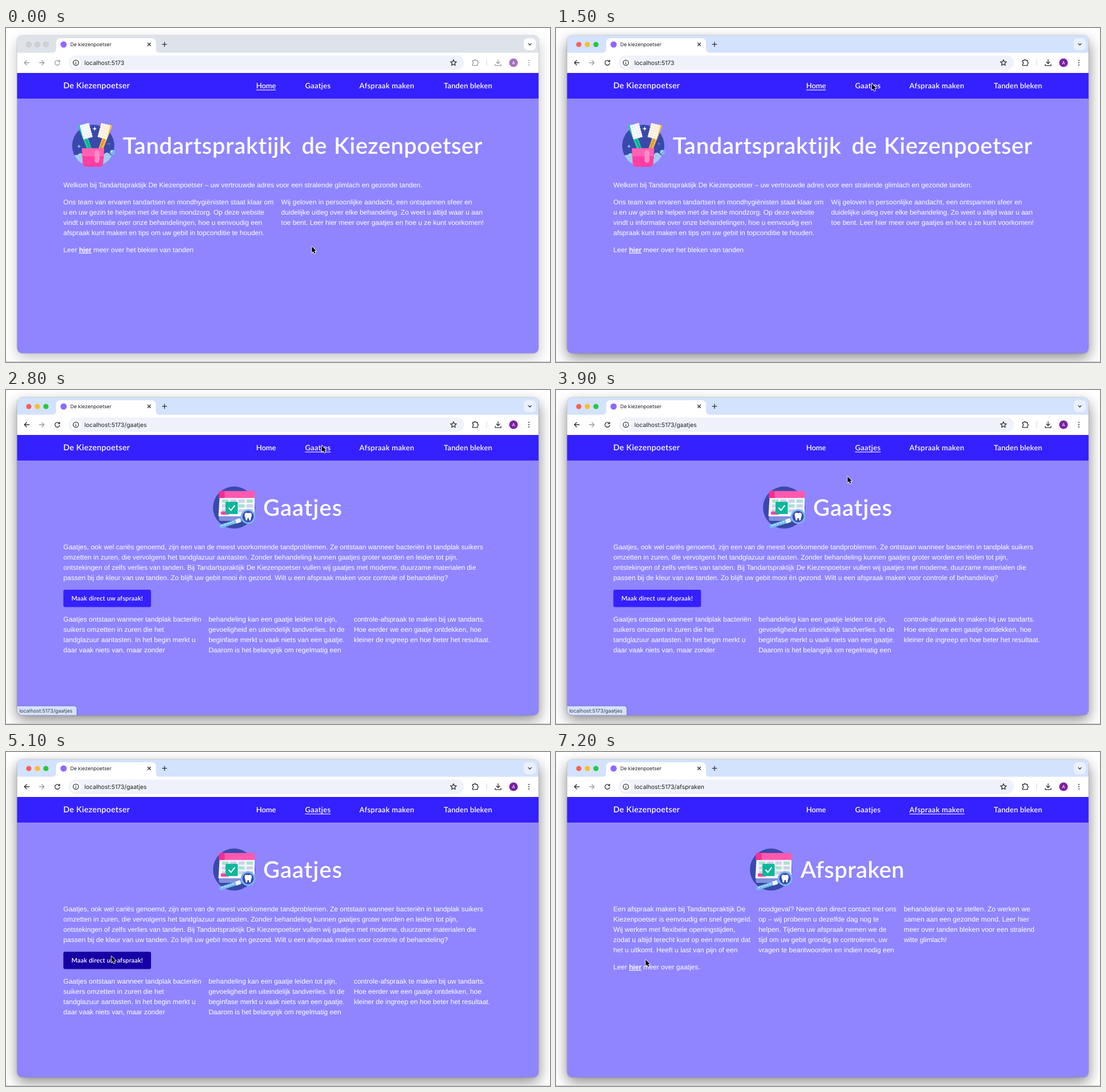
Recreate the animation shown at these times as an HTML page. Size 954 by 587 pixels, loop 8 s.

```html
<!DOCTYPE html>
<html lang="nl">
<head>
<meta charset="utf-8">
<title>De kiezenpoetser</title>
<style>
html, body { margin: 0; width: 100%; height: 100%; overflow: hidden; background: #fff; }
svg { display: block; width: 954px; height: 587px; --strip: #dee2e9; --icon: #9a9c9f; --chip: #fff; --user: #a56fc1;
  --r: #d0d1d4; --y: #d0d1d4; --g: #d0d1d4; --edge: #bfc0c3; }
svg.on { --strip: #d3e2fd; --icon: #2f3235; --chip: #eaf1fe; --user: #7b1fa2;
  --r: #fe5f57; --y: #febc2e; --g: #28c840; --edge: none; }
text { text-rendering: geometricPrecision; white-space: pre; }
.body { font: 12.03px "Liberation Sans", Arial, sans-serif; fill: #fff; }
.body .link { font-weight: 700; text-decoration: underline; }
.round { font-family: Lato, sans-serif; font-weight: 600; fill: #fff; }
.ui { font-family: Inter, sans-serif; fill: #202124; }
.line { fill: none; stroke-width: 1.3; stroke-linecap: round; stroke-linejoin: round; }
</style>
</head>
<body>
<svg id="stage" viewBox="0 0 954 587" xmlns="http://www.w3.org/2000/svg">
  <defs>
    <clipPath id="frame"><rect x="19.6" y="13.2" width="914.2" height="558.2" rx="8.5"/></clipPath>
    <clipPath id="disc"><circle cx="153" cy="207" r="37"/></clipPath>
    <filter id="soft" x="-10%" y="-10%" width="120%" height="125%"><feGaussianBlur stdDeviation="12"/></filter>
    <filter id="near" x="-10%" y="-10%" width="120%" height="125%"><feGaussianBlur stdDeviation=".8"/></filter>
  </defs>
  <rect width="954" height="587" fill="#fff"/>
  <rect id="shade" x="19" y="23" width="916" height="557" rx="9" filter="url(#soft)"/>
  <rect x="19.3" y="13" width="914.800" height="559" rx="9" opacity=".2" filter="url(#near)"/>
  <rect y="586" width="954" height="1" fill="#c6c6c8"/>

  <g clip-path="url(#frame)">
    <rect x="19" y="13" width="916" height="32" fill="var(--strip)"/>
    <rect x="19" y="43.5" width="916" height="36" fill="#fff"/>
    <path d="M80 44q8 0 8-8V26q0-8 8-8H255q8 0 8 8V36q0 8 8 8Z" fill="#fff"/>
    <g stroke="var(--edge)" stroke-width=".7">
      <circle cx="40" cy="29" r="4.6" fill="var(--r)"/>
      <circle cx="55" cy="29" r="4.6" fill="var(--y)"/>
      <circle cx="70" cy="29" r="4.6" fill="var(--g)"/>
    </g>
    <circle cx="101" cy="29" r="5.5" fill="#9068ff"/>
    <text class="ui" x="112.7" y="31.8" font-size="8.75">De kiezenpoetser</text>
    <g class="line" stroke="#2f3235">
      <path d="M248.6 26.2l5 5m0-5l-5 5M274.2 28.7h7.6m-3.8-3.8v7.6"/>
    </g>
    <rect x="908" y="18" width="21" height="21" rx="6.5" fill="var(--chip)"/>
    <path class="line" d="M916 27.4l2.6 2.6 2.6-2.6" stroke="#2f3235"/>

    <rect x="110" y="48.3" width="693" height="25.4" rx="12.7" fill="#eff2fa"/>
    <circle cx="122.5" cy="61" r="9" fill="#fff"/>
    <g class="line" stroke="#2f3235">
      <circle cx="122.5" cy="61" r="4.7"/>
      <path d="M122.5 60.8v2.4M122.5 58.6v.1"/>
      <path d="M784.7 55.8l1.5 3.4 3.7.3-2.8 2.5.8 3.7-3.2-2-3.2 2 .8-3.7-2.8-2.5 3.7-.3z"/>
    </g>
    <text class="ui" id="url" x="137.6" y="64.7" font-size="10.4"></text>
    <g class="line" stroke="var(--icon)">
      <path d="M40.7 61H32.2m4-4l-4 4 4 4"/>
      <path d="M58.5 61H67m-4-4l4 4-4 4" stroke="#9a9c9f"/>
      <path d="M93.7 59a4.2 4.2 0 1 0 .5 2.800M94.2 56.4v2.800h-2.800"/>
      <path d="M818.2 57h2.7a1.5 1.5 0 0 1 3 0h2.9v2.9a1.5 1.5 0 0 1 0 3v3h-8.6v-2.7a1.7 1.7 0 0 0 0-3.4z"/>
      <path d="M863 55.6v7m-3-2.9l3 3 3-3M858 63.6v2.6h10v-2.6"/>
    </g>
    <rect x="842.3" y="55.5" width="1.2" height="11" fill="#cfdcf7"/>
    <circle cx="890" cy="61" r="7.6" fill="var(--user)"/>
    <text class="ui" x="890" y="64" font-size="8" text-anchor="middle" style="fill:#fff">A</text>
    <g fill="var(--icon)"><circle cx="917" cy="57" r="1.1"/><circle cx="917" cy="61" r="1.1"/><circle cx="917" cy="65" r="1.1"/></g>

    <rect x="19" y="79" width="916" height="493" fill="#8f85ff"/>
    <rect x="19" y="79" width="916" height="45" fill="#3520ff"/>
    <g id="nav"></g>
    <rect id="mark" y="108.4" height="1.1" fill="#fff"/>

    <g id="home">
      <circle cx="153" cy="207" r="37" fill="#3949ab"/>
      <g clip-path="url(#disc)" fill="#a3cdf0">
        <circle cx="124" cy="231" r="8"/><circle cx="131" cy="226" r="6"/><circle cx="131" cy="238" r="9"/>
        <circle cx="177" cy="225" r="6"/><circle cx="182" cy="231" r="8"/><circle cx="174" cy="237" r="9"/>
      </g>
      <circle cx="186.7" cy="218.5" r="4.6" fill="#79b7ea"/>
      <path d="M184.5 218a2.4 2.4 0 0 1 2-2" class="line" stroke="#d8eefc"/>
      <g id="brushes"></g>
      <path d="M133 211.5h39l-1.5 26q-.6 6.5-7 6.5h-22q-6.4 0-7-6.5z" fill="#ff3fa2"/>
      <path d="M133 211.5h39l-.8 14h-37.4z" fill="#ff62b4"/>
      <rect x="155.5" y="215" width="8.5" height="22" rx="4.2" fill="#ff8cca"/>
      <g id="stars"></g>
    </g>

    <g id="calendar">
      <circle cx="400" cy="206.6" r="37" fill="#3949ab"/>
      <path d="M374.5 189h61.5v33h-63.5z" fill="#f4f5fd"/>
      <path d="M373.5 222h40v8h-37q-3 0-3-3z" fill="#8290dd"/>
      <path d="M376 177.5h58q2.5 0 2.5 2.5v9.8h-63l.5-10q.2-2.3 2-2.3z" fill="#ff58b0"/>
      <path d="M376 177.5h7.5v12.3h-10l.5-10q.2-2.3 2-2.3z" fill="#f72d93"/>
      <g id="cells"></g>
      <rect x="377" y="213.5" width="14" height="5.5" rx="1" fill="#ff3fa2"/>
      <rect x="385" y="196.5" width="21.5" height="21.5" rx="1.5" fill="#10b69a"/>
      <path d="M391 207.5l3.6 4 6.2-8.2" class="line" stroke="#fff" style="stroke-width:2"/>
      <path d="M377.5 239.5L410 229" stroke="#75bdec" stroke-width="6.5" stroke-linecap="round"/>
      <path d="M378 238.3L400 231.3" stroke="#b8e2f8" stroke-width="2" stroke-dasharray="3 2"/>
      <path d="M403 231.3l8-2.6" stroke="#f4f5fd" stroke-width="7"/>
      <circle cx="424.5" cy="222.5" r="11.4" fill="#3949b5" stroke="#78b7ec" stroke-width="3"/>
      <path d="M418.5 219.5q0-4 3.4-3.7l2.8.8 2.8-.8q3.4-.3 3.4 3.7 0 3-1.3 5-.4 5-2 5-1.3 0-1.5-3.5-1.4-1.8-2.8 0-.2 3.5-1.5 3.5-1.6 0-2-5-1.3-2-1.3-5z" fill="#fff"/>
    </g>

    <g id="holes">
      <rect id="button" x="100.6" y="351" width="153.7" height="30.5" rx="3"/>
    </g>
    <g id="visit"></g>

    <g id="status">
      <path d="M18 555.2H120q4.800 0 4.800 5V573H18z" fill="#5a58a8" opacity=".5" filter="url(#near)"/>
      <path d="M18 555.800H119.500q4.300 0 4.300 4.500V572H18z" fill="#d5e2fb"/>
      <text class="ui" x="23.2" y="566.800" font-size="8.9" style="fill:#3c4043">localhost:5173/gaatjes</text>
    </g>
  </g>
  <path id="cursor" d="M0 0V10.8L2.5 8.5 4.2 12.4 6 11.6 4.300 7.800H7.600Z" fill="#000" stroke="#fff" stroke-width="1.7" stroke-linejoin="round" paint-order="stroke"/>
</svg>
<script>
const $ = id => document.getElementById(id);
const add = (id, html) => $(id).insertAdjacentHTML('beforeend', html);
const LEFT = 100.6;

function lines(id, x, y, rows) {
  rows.forEach((row, i) => add(id, `<text class="body" x="${x}" y="${y + i * 18}">${row}</text>`));
}
function round(id, x, y, size, gap, str, anchor = 'start') {
  add(id, `<text class="round" x="${x}" y="${y}" font-size="${size}" letter-spacing="${gap}" text-anchor="${anchor}">${str}</text>`);
}

// Navigation: x, underline width, letter gap, label
const menu = [
  [438.8, 34.5, -.1, 'Home'], [524.4, 45, .3, 'Gaatjes'],
  [619.8, 96.7, .3, 'Afspraak maken'], [767.8, 85, .15, 'Tanden bleken']
];
round('nav', LEFT, 106.3, 14.3, .25, 'De Kiezenpoetser');
menu.forEach(([x, , gap, label]) => round('nav', x, 106, 13, gap, label));

// Illustrations
function brush(x, y, angle, side, body, dark, hair, shade) {
  let dots = '';
  for (let r = 0; r < 6; r++)
    for (let c = 0; c < 4; c++)
      dots += `<circle cx="${c * 4.2 - 3.5}" cy="${r * 4.3 - 10.700}" r="2.3"/>`;
  add('brushes', `<g transform="translate(${x} ${y}) rotate(${angle}) scale(${side} 1)">
    <path d="M-9-11q0-2.500 2.500-2.500H1L5 46H-2z" fill="${body}"/>
    <path d="M-3 14H0L5 46H2z" fill="${dark}"/>
    <rect x="-5.500" y="-12.500" width="16" height="25" rx="2" fill="${shade}"/><g fill="${hair}">${dots}</g></g>`);
}
brush(138, 182, -15, 1, '#22c9a6', '#14ad91', '#fafbff', '#d5daee');
brush(174.5, 182, 15, -1, '#f3b650', '#dd9838', '#fff6e6', '#f0d9b0');

const star = (x, y, r, fill) => add('stars',
  `<path transform="translate(${x} ${y}) scale(${r})" d="M0-1L.25-.25 1 0 .25.25 0 1-.25.25-1 0-.25-.25Z" fill="${fill}"/>`);
star(155.5, 177, 4, '#fff');
star(128, 208, 3.6, '#8cc4f2');
star(180.5, 203.5, 3.2, '#5d7fe0');

for (let r = 0; r < 3; r++)
  for (let c = 0; c < 4; c++) {
    const fill = (r + c) % 3 ? '#cdd1ea' : '#a5e4cd';
    add('cells', `<rect x="${379 + c * 14.3}" y="${192.5 + r * 8.5}" width="11" height="5.5" fill="${fill}"/>`);
  }

// Home page
round('home', 204.8, 221, 40, .7, 'Tandartspraktijk');
round('home', 518.5, 221, 40, .3, 'de');
round('home', 575, 221, 40, .5, 'Kiezenpoetser');
lines('home', LEFT, 280, ['Welkom bij Tandartspraktijk De Kiezenpoetser – uw vertrouwde adres voor een stralende glimlach en gezonde tanden.']);
lines('home', LEFT, 310, [
  'Ons team van ervaren tandartsen en mondhygiënisten staat klaar om',
  'u en uw gezin te helpen met de beste mondzorg. Op deze website',
  'vindt u informatie over onze behandelingen, hoe u eenvoudig een',
  'afspraak kunt maken en tips om uw gebit in topconditie te houden.']);
lines('home', 482.6, 310, [
  'Wij geloven in persoonlijke aandacht, een ontspannen sfeer en',
  'duidelijke uitleg over elke behandeling. Zo weet u altijd waar u aan',
  'toe bent. Leer hier meer over gaatjes en hoe u ze kunt voorkomen!']);
lines('home', LEFT, 394, ['Leer <tspan class="link">hier</tspan> meer over het bleken van tanden']);

// Cavities page
round('holes', 520.5, 221, 40, 1, 'Gaatjes', 'middle');
lines('holes', LEFT, 280, [
  'Gaatjes, ook wel cariës genoemd, zijn een van de meest voorkomende tandproblemen. Ze ontstaan wanneer bacteriën in tandplak suikers',
  'omzetten in zuren, die vervolgens het tandglazuur aantasten. Zonder behandeling kunnen gaatjes groter worden en leiden tot pijn,',
  'ontstekingen of zelfs verlies van tanden. Bij Tandartspraktijk De Kiezenpoetser vullen wij gaatjes met moderne, duurzame materialen die',
  'passen bij de kleur van uw tanden. Zo blijft uw gebit mooi én gezond. Wilt u een afspraak maken voor controle of behandeling?']);
round('holes', 177.5, 370.2, 11, .15, 'Maak direct uw afspraak!', 'middle');
lines('holes', LEFT, 407, [
  'Gaatjes ontstaan wanneer tandplak bacteriën', 'suikers omzetten in zuren die het',
  'tandglazuur aantasten. In het begin merkt u', 'daar vaak niets van, maar zonder']);
lines('holes', 355.2, 407, [
  'behandeling kan een gaatje leiden tot pijn,', 'gevoeligheid en uiteindelijk tandverlies. In de',
  'beginfase merkt u vaak niets van een gaatje.', 'Daarom is het belangrijk om regelmatig een']);
lines('holes', 609.9, 407, [
  'controle-afspraak te maken bij uw tandarts.', 'Hoe eerder we een gaatje ontdekken, hoe',
  'kleiner de ingreep en hoe beter het resultaat.']);

// Appointment page
round('visit', 520, 221, 40, .4, 'Afspraken', 'middle');
lines('visit', LEFT, 280, [
  'Een afspraak maken bij Tandartspraktijk De', 'Kiezenpoetser is eenvoudig en snel geregeld.',
  'Wij werken met flexibele openingstijden,', 'zodat u altijd terecht kunt op een moment dat',
  'het u uitkomt. Heeft u last van pijn of een']);
lines('visit', 355.2, 280, [
  'noodgeval? Neem dan direct contact met ons', 'op – wij proberen u dezelfde dag nog te',
  'helpen. Tijdens uw afspraak nemen we de', 'tijd om uw gebit grondig te controleren, uw',
  'vragen te beantwoorden en indien nodig een']);
lines('visit', 609.9, 280, [
  'behandelplan op te stellen. Zo werken we', 'samen aan een gezonde mond. Leer hier',
  'meer over tanden bleken voor een stralend', 'witte glimlach!']);
lines('visit', LEFT, 382, ['Leer <tspan class="link">hier</tspan> meer over gaatjes.']);

// Pointer route: time, x, y
const route = [
  [0, 536.4, 384], [300, 541, 330], [600, 555, 190], [900, 558, 112], [1400, 554, 98],
  [3600, 554, 98], [3800, 538, 118], [4100, 458, 220], [4400, 377.8, 313.8], [4500, 358, 330],
  [4800, 262, 347], [5100, 185, 359], [5400, 156.5, 363], [6200, 157.2, 365], [8000, 157.2, 365]
];
function along(t) {
  let i = 1;
  while (route[i][0] < t) i++;
  const [t0, x0, y0] = route[i - 1], [t1, x1, y1] = route[i];
  const k = (t - t0) / (t1 - t0);
  return [x0 + (x1 - x0) * k, y0 + (y1 - y0) * k];
}
const clamp = v => Math.max(0, Math.min(1, v));
const show = (id, on) => $(id).style.display = on ? '' : 'none';
const paths = ['', '/gaatjes', '/afspraken'];

function draw(time) {
  const t = Math.floor(time / 100) * 100;
  const page = t < 2800 ? 0 : t < 7100 ? 1 : 2;
  const focus = t >= 1500;
  $('stage').classList.toggle('on', focus);
  $('shade').setAttribute('opacity', focus ? .46 : .22);
  $('url').textContent = 'localhost:5173' + paths[page];
  $('mark').setAttribute('x', menu[page][0]);
  $('mark').setAttribute('width', menu[page][1]);
  ['home', 'holes', 'visit'].forEach((id, i) => show(id, i === page));
  show('calendar', page > 0);
  $('calendar').setAttribute('transform', `translate(${page === 2 ? -23 : 0} 0)`);
  $('status').setAttribute('opacity', clamp((t - 2400) / 200) * clamp((4100 - t) / 200));

  const [x, y] = along(t);
  $('cursor').setAttribute('transform', `translate(${x} ${y})`);
  const over = x > LEFT && x < 254.3 && y > 351 && y < 381.5;
  $('button').setAttribute('fill', over ? '#1400a4' : '#3520ff');
}
function loop() {
  draw(performance.now() % 8000);
  requestAnimationFrame(loop);
}
loop();
</script>
</body>
</html>
```
